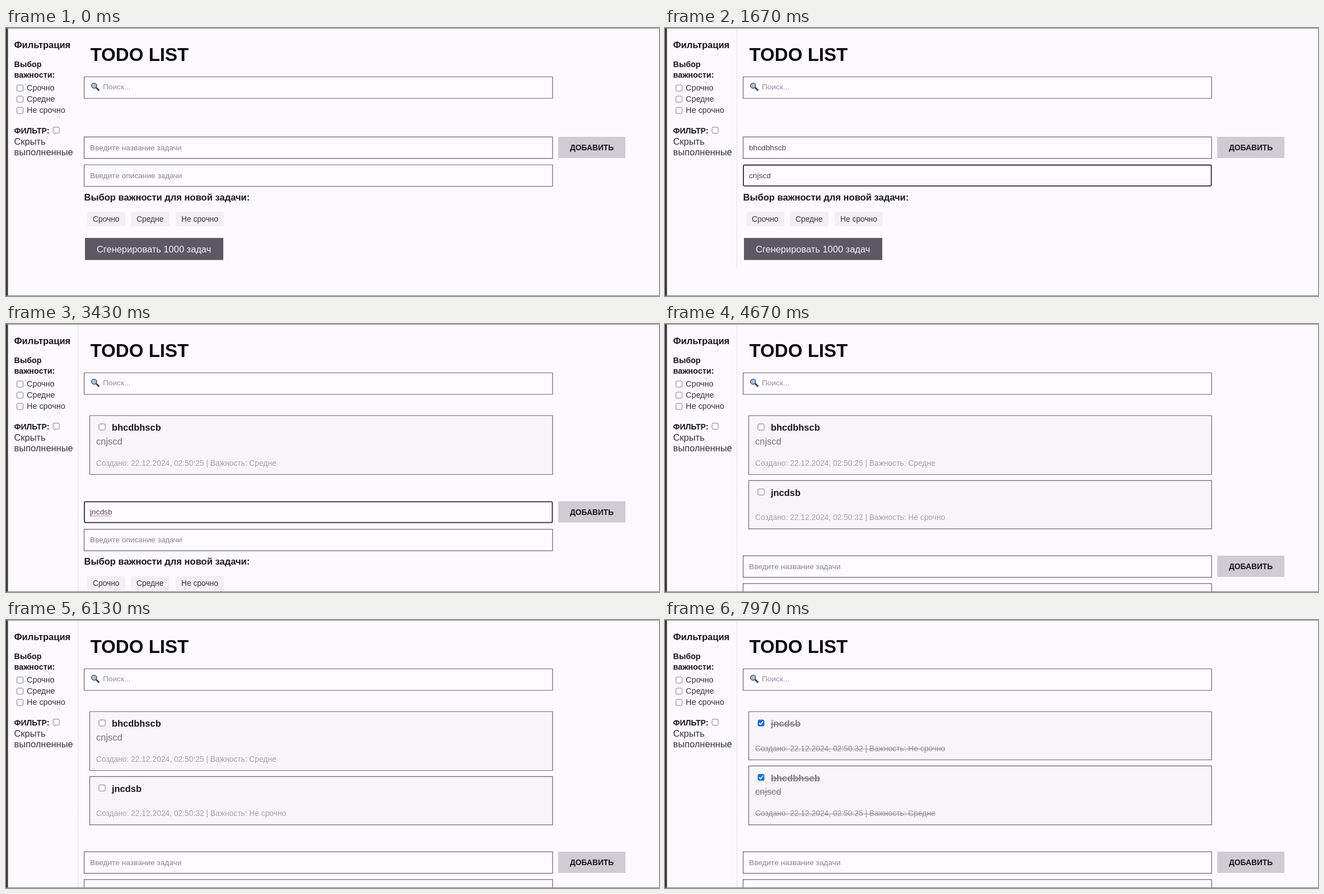
Recreate the animation shown at these times as an HTML page with a canvas. Size 1166 px wide and 480 px high, loop 8000 ms.

```html
<!DOCTYPE html>
<html lang="ru">
<head>
<meta charset="utf-8">
<title>Todo list</title>
<style>
  html, body { margin: 0; width: 100%; height: 100%; overflow: hidden; background: #fcfaff; }
  canvas { display: block; }
</style>
</head>
<body>
<canvas id="stage" width="1166" height="480"></canvas>
<script>
const ctx = document.getElementById('stage').getContext('2d');
const LOOP = 8000;
const INK = '#18171b', GREY = '#85818c', PALE = '#a5a1ad', EDGE = '#69636a';
const LEVELS = ['Срочно', 'Средне', 'Не срочно'];
const CHIPS = [[145, 68], [223, 69], [303, 86]];

const FIRST = { title: 'bhcdbhscb', desc: 'cnjscd', time: '02:50:25', level: 1, added: 2600, done: 6750 };
const SECOND = { title: 'jncdsb', desc: '', time: '02:50:32', level: 2, added: 4350, done: 7350 };

const within = (t, a, b) => t >= a && t < b;

function typed(word, t, start, end) {
  const part = Math.min(1, Math.max(0, (t - start) / (end - start)));
  return word.slice(0, Math.ceil(part * word.length));
}

function text(str, x, y, size, color = INK, bold = false, strike = false) {
  ctx.font = `${bold ? 'bold ' : ''}${size}px "Liberation Sans", Arial, sans-serif`;
  ctx.fillStyle = color;
  ctx.fillText(str, x, y);
  if (strike) ctx.fillRect(x, y - size * 0.32, ctx.measureText(str).width, bold ? 1.6 : 1.1);
}

function box(x, y, w, h, { fill, stroke, line = 1, radius = 0 }) {
  ctx.beginPath();
  ctx.roundRect(x, y, w, h, radius);
  if (fill) { ctx.fillStyle = fill; ctx.fill(); }
  if (stroke) { ctx.strokeStyle = stroke; ctx.lineWidth = line; ctx.stroke(); }
}

function path(points, color, width) {
  ctx.beginPath();
  points.forEach(([x, y]) => ctx.lineTo(x, y));
  ctx.strokeStyle = color;
  ctx.lineWidth = width;
  ctx.stroke();
}

function checkbox(cx, cy, checked) {
  box(cx - 5.5, cy - 5.5, 11, 11, checked
    ? { fill: '#176fd6', stroke: '#176fd6', radius: 2 }
    : { fill: '#fff', stroke: '#7d7985', radius: 2 });
  if (checked) path([[cx - 3.5, cy], [cx - 1, cy + 2.8], [cx + 3.8, cy - 3]], '#fff', 1.8);
}

function field(y, value, hint, focused, misspelt) {
  if (focused) box(140, y + 0.5, 835.5, 37.3, { fill: '#fdfbff', stroke: '#2c2a30', line: 1.8, radius: 2 });
  else box(139.5, y, 836.5, 38.5, { fill: '#fdfbff', stroke: EDGE, line: 1.2 });
  text(value || hint, 150, y + 23.5, 13.7, value ? '#48454d' : GREY);
  if (focused && misspelt && value) {
    const wave = [];
    for (let x = 0; x <= ctx.measureText(value).width; x += 2) wave.push([150 + x, y + 26 + (x % 4 ? 1 : -1)]);
    path(wave, '#d8657c', 1);
  }
}

function sidebar(t, height) {
  text('Фильтрация', 14.5, 36, 16.5, INK, true);
  text('Выбор', 14.5, 70, 14.4, INK, true);
  text('важности:', 14.5, 88.5, 14.4, INK, true);
  LEVELS.forEach((name, i) => {
    checkbox(25, 107.5 + i * 20, false);
    text(name, 37, 112 + i * 20, 14.4, '#333138');
  });
  text('ФИЛЬТР:', 14.5, 189, 14, INK, true);
  checkbox(89.5, 183, false);
  text('Скрыть', 14.5, 209, 16.45, '#333138');
  text('выполненные', 14.5, 228, 16.45, '#333138');
  if (t < 200) return;
  ctx.setLineDash([2, 1]);
  path([[128.5, 0], [128.5, height]], '#e2cfcc', 1);
  ctx.setLineDash([]);
}

function search() {
  box(139.5, 87.5, 836.5, 38.5, { fill: '#fdfbff', stroke: EDGE, line: 1.2 });
  path([[160.5, 106.5], [166.5, 112]], '#3d3a45', 3);
  ctx.beginPath();
  ctx.arc(157.3, 103.3, 4.6, 0, 7);
  ctx.fillStyle = '#a9c4e6';
  ctx.fill();
  ctx.strokeStyle = '#56566a';
  ctx.lineWidth = 1.6;
  ctx.stroke();
  text('Поиск...', 173, 110, 13.7, '#918da0');
}

// Returns the height used, including the gap to the next card.
function card(task, y, t) {
  const done = t >= task.done;
  const height = task.desc ? 105.5 : 86.5;
  box(149.5, y, 826.5, height, { fill: '#f8f5fa', stroke: EDGE, line: 1.2 });
  checkbox(171.5, y + 20.5, done);
  text(task.title, 189, y + 27.3, 16.45, done ? GREY : INK, true, done);
  if (task.desc) text(task.desc, 161, y + 51.5, 16.5, done ? GREY : '#77737d', false, done);
  const meta = `Создано: 22.12.2024, ${task.time} | Важность: ${LEVELS[task.level]}`;
  text(meta, 161, y + height - 15.5, 13.8, done ? '#928e99' : PALE, false, done);
  return height + 10.8;
}

function form(t, top) {
  const again = t >= FIRST.added;
  const cleared = t >= SECOND.added;
  const name = cleared ? '' : again ? typed(SECOND.title, t, 3000, 3400) : typed(FIRST.title, t, 150, 650);
  const desc = again ? '' : typed(FIRST.desc, t, 800, 1200);
  const level = within(t, 1750, FIRST.added) ? FIRST.level
    : within(t, 3900, SECOND.added) ? SECOND.level : -1;
  const nameFocus = within(t, 100, 750) || within(t, 2900, 3900);

  ctx.save();
  ctx.translate(0, top);
  field(195.2, name, 'Введите название задачи', nameFocus, true);
  field(245, desc, 'Введите описание задачи', within(t, 750, 1750), false);
  box(986, 195, 120, 38, { fill: '#cfccd3' });
  text('ДОБАВИТЬ', 1007, 219, 13.8, INK, true);
  text('Выбор важности для новой задачи:', 139.5, 308.5, 16.55, INK, true);
  CHIPS.forEach(([x, w], i) => {
    const on = i === level;
    box(x, 329, w, 26.5, { fill: on ? '#0b78ee' : '#f3f0f3', radius: 4 });
    text(LEVELS[i], x + 10, 346.5, 13.8, on ? '#e8f2ff' : '#38363c');
  });
  box(141, 376, 247, 39.5, { fill: '#5c5964' });
  text('Сгенерировать 1000 задач', 162, 401.5, 16.45, '#f4f2f8');
  ctx.restore();
}

function draw(t) {
  ctx.fillStyle = '#fcfaff';
  ctx.fillRect(0, 0, 1166, 480);

  // A completed task moves below the others.
  const tasks = (t >= FIRST.done ? [SECOND, FIRST] : [FIRST, SECOND]).filter(task => t >= task.added);
  let y = 164;
  for (const task of tasks) y += card(task, y, t);
  const top = tasks.length ? y - 157.7 : 0;

  sidebar(t, 430 + top);
  text('TODO LIST', 150.5, 59, 33.1, '#0d0c10', true);
  search();
  form(t, top);

  ctx.fillStyle = '#38363b';
  ctx.fillRect(0, 0, 3.5, 480);
  ctx.fillStyle = '#77757d';
  ctx.fillRect(0, 0, 1166, 1);
  ctx.fillRect(0, 479, 1166, 1);
}

const start = performance.now();
function tick() {
  draw((performance.now() - start) % LOOP);
  requestAnimationFrame(tick);
}
tick();
</script>
</body>
</html>
```
